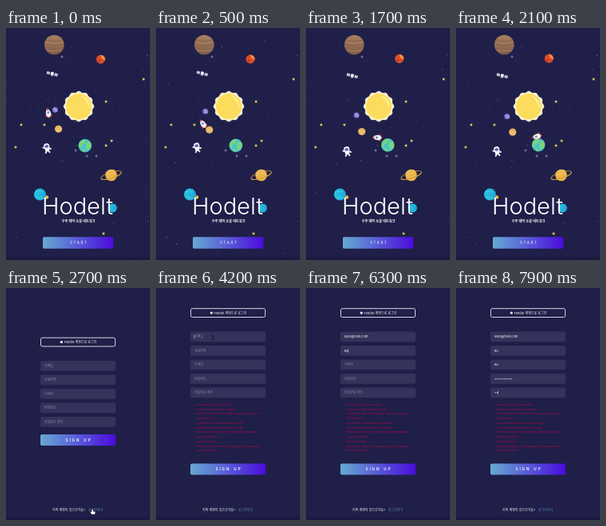
An HTML page for the animation above (8000 ms loop, 180 by 290 pixels).

```html
<!DOCTYPE html>
<html lang="ko">
<head>
<meta charset="utf-8">
<style>
  html, body { margin: 0; width: 100%; height: 100%; overflow: hidden; background: #1f1f49; }
  svg { display: block; width: 100vw; height: 100vh; }
  text { font-family: "Noto Sans CJK KR", "Noto Sans CJK", "Noto Sans", sans-serif; font-size: 4px; fill: #fff; }
  .latin { font-family: Inter, Roboto, sans-serif; }
  .hint { fill: #8f8da9; }
  .error { font-family: "Noto Sans", sans-serif; fill: #a80b48; }
</style>
</head>
<body>
<svg viewBox="0 0 180 290">
  <defs>
    <linearGradient id="action"><stop stop-color="#66a9d2"/><stop offset="1" stop-color="#4a0bdc"/></linearGradient>
    <linearGradient id="brown" x2="0" y2="1"><stop stop-color="#a8805f"/><stop offset="1" stop-color="#805c4b"/></linearGradient>
    <linearGradient id="teal"><stop stop-color="#27c8e2"/><stop offset="1" stop-color="#1fa5d8"/></linearGradient>
  </defs>
  <rect width="180" height="290" fill="#1f1f49"/>

  <g id="space">
    <g id="rings" fill="none" stroke="#2b2b56" stroke-width=".5"></g>
    <g id="dust" fill="#c9c8e4"></g>
    <g id="stars"></g>
    <g transform="translate(60.3 21)">
      <circle r="12.3" fill="url(#brown)"/>
      <path d="M-10-6Q0-3 10-6M-12-1Q0 2 12-1M-11 4Q0 7 11 4" fill="none" stroke="#8a664f" stroke-width="1.2"/>
      <path d="M-11-3Q0 0 11-3M-9 7Q0 9 9 7" fill="none" stroke="#b18e6c" stroke-width=".7"/>
    </g>
    <g id="red">
      <circle r="5.6" fill="#dc4b2a"/>
      <path d="M0-5.4A5.5 5.5 0 0 1 5.4 1Q3 0 1-1Z" fill="#f3913a"/>
      <circle cx="-2" cy="2" r="1.2" fill="#b83126"/>
    </g>
    <g id="satellite">
      <g transform="rotate(14)">
        <path d="M-7-1.7h4v3.4h-4zM3-1.7h4v3.4H3z" fill="#d3d7e6"/>
        <path d="M-5-1.7v3.4M5-1.7v3.4M-3 0H3" stroke="#6f7796" stroke-width=".5"/>
        <rect x="-1.8" y="-2.3" width="3.6" height="4.6" rx=".8" fill="#f4f4f8"/>
        <circle cy="2" r="1.1" fill="#9aa3ba"/>
      </g>
    </g>
    <g transform="translate(91 98)">
      <path id="corona" fill="#fff3c4" stroke="#fff" stroke-width=".8"/>
      <circle r="16" fill="#fbdc5c"/>
      <path d="M2-14A14 14 0 0 1 13 3Q10-9 2-14Z" fill="#feee9c"/>
    </g>
    <g id="violet">
      <circle r="3.5" fill="#7970ce"/>
      <path d="M-2-1H2M-1 1H3" stroke="#c3bcf2"/>
    </g>
    <g id="gold">
      <circle r="4.6" fill="#e5b661"/>
      <path d="M-4-1Q0 1 4-1M-3 2H3" fill="none" stroke="#f3cf83" stroke-width=".8"/>
    </g>
    <g id="earth">
      <circle r="8.3" fill="#48c4c8"/>
      <path d="M-7-4Q-3-9 1-7L0-3L-4-1L-5 3L-8 1ZM2-4L6-5Q9-1 7 3L3 6L1 2ZM-3 4L0 5L-1 8Q-4 7-5 5Z" fill="#78d47c"/>
    </g>
    <g id="rocket">
      <path d="M-4-1.6L-7 0L-4 1.6Z" fill="#f3a13c"/>
      <path d="M-3-2L-6-4.4L1-3ZM-3 2L-6 4.4L1 3Z" fill="#d93c4b"/>
      <path d="M-5-2Q1-5 6 0Q1 5-5 2Z" fill="#f1f1f6"/>
      <path d="M3.6-1.8Q5-1 6 0Q5 1 3.6 1.8Z" fill="#d93c4b"/>
      <circle cx=".5" r="1.3" fill="#4c81c5"/>
    </g>
    <g id="astronaut">
      <g transform="rotate(-10)">
        <path d="M-2 0L-4.6-1.5M2 0L4.6 1.5M-1 3L-2.4 5.4M1 3L2.4 5.4" stroke="#e3e4f3" stroke-width="2" stroke-linecap="round"/>
        <rect x="-2.6" y="-1" width="5.2" height="5" rx="1.7" fill="#f6f6fc"/>
        <circle cy="-2.6" r="3.6" fill="#f6f6fc"/>
        <ellipse cy="-2.4" rx="2.4" ry="1.9" fill="#6a62ba"/>
      </g>
    </g>
    <g transform="translate(131.5 184) rotate(-18)">
      <ellipse rx="13.3" ry="4" fill="none" stroke="#a98335" stroke-width="1"/>
      <circle r="7.3" fill="#ecb44b"/>
      <path d="M-7-2H7M-6-5H6" stroke="#f3c772" stroke-width=".8"/>
      <path d="M-13.3 0A13.3 4 0 0 0 13.3 0" fill="none" stroke="#c99a3c"/>
    </g>
    <circle cx="51" cy="211.5" r="2.2" fill="#efbf4a"/>
    <g transform="translate(42.5 208)">
      <circle r="7.5" fill="url(#teal)"/>
      <path d="M-6-3Q0-5 4-3M-4 4H3" fill="none" stroke="#4fd3e6" stroke-width=".8"/>
    </g>
    <circle cx="133.3" cy="225" r="5.5" fill="url(#teal)"/>
    <text class="latin" x="45" y="233.2" style="font-size:29px;font-weight:300">Hodelt</text>
    <text x="90.5" y="242.7" text-anchor="middle" style="font-size:4.15px;font-weight:700">우주 테마 소셜 네트워크</text>
    <rect x="46" y="261.3" width="88.3" height="14.4" rx="1.6" fill="url(#action)"/>
    <text class="latin" x="91.3" y="270.1" text-anchor="middle" letter-spacing="1.8" style="font-size:4.3px">START</text>
  </g>

  <g id="signup">
    <g id="form">
      <rect x="43.5" y="62.2" width="93" height="10.8" rx="2" fill="none" stroke="#e9e8f1" stroke-width=".9"/>
      <circle cx="69.3" cy="67.6" r="1.6" fill="#fff"/>
      <text x="72.5" y="69.2" style="font-weight:500">Fendol 계정으로 로그인</text>
      <g id="fields"></g>
    </g>
    <g id="errors"></g>
    <g id="submit">
      <rect x="43" y="183" width="94" height="14" rx="2" fill="url(#action)"/>
      <text class="latin" x="91" y="191.6" text-anchor="middle" letter-spacing="1.9" word-spacing="1" style="font-size:4.6px;font-weight:600">SIGN UP</text>
    </g>
    <text x="58" y="278.7" style="font-weight:500">이미 계정이 있으신가요?</text>
    <text x="103" y="278.7" style="fill:#5b91c9">로그인하기</text>
    <path id="caret" d="M0-2.2V2.2" stroke="#fff" stroke-width=".5"/>
  </g>

  <path id="hand" d="M-1 0Q0-1 1 0V2L3 2.6Q4 3 3.5 5L3 6H-1L-3 3Q-2 2-1 3Z" fill="#fff" stroke="#171522" stroke-width=".4"/>
  <path id="beam" d="M-1-2.5H1M0-2.5V2.5M-1 2.5H1" fill="none" stroke="#090817" stroke-width=".7"/>
  <rect y="286.5" width="180" height="3.5" fill="#1b193f"/>
</svg>
<script>
const $ = id => document.getElementById(id);
const LOOP = 8000, FORM_AT = 2300, ERRORS_AT = 3400;
const SHIFT = 36.5;

function add(parent, tag, attrs, content = '') {
  const node = document.createElementNS('http://www.w3.org/2000/svg', tag);
  for (const key in attrs) node.setAttribute(key, attrs[key]);
  node.textContent = content;
  return parent.appendChild(node);
}
const show = (node, on) => node.setAttribute('visibility', on ? 'visible' : 'hidden');
const place = (node, x, y, turn = 0) =>
  node.setAttribute('transform', `translate(${x} ${y}) rotate(${turn})`);

// Closed curve whose radius depends on its angle
function radial(radiusAt, steps) {
  return 'M' + Array.from({ length: steps }, (_, i) => {
    const a = i / steps * 2 * Math.PI;
    const r = radiusAt(a, i);
    return (r * Math.sin(a)).toFixed(2) + ' ' + (-r * Math.cos(a)).toFixed(2);
  }).join('L') + 'Z';
}
$('corona').setAttribute('d', radial(a => 18 + .8 * Math.cos(a * 12), 144));

for (const r of [30, 38, 50, 60]) add($('rings'), 'circle', { cx: 91, cy: 98, r });

let seed = 17;
const random = () => (seed = seed * 16807 % 2147483647) / 2147483647;
const dust = Array.from({ length: 85 }, () => ({
  node: add($('dust'), 'circle', {
    cx: 2 + random() * 176, cy: 5 + random() * 278, r: .25 + random() * .35
  }),
  phase: random() * 6.28
}));

const starPath = radial((a, i) => i % 2 ? 1 : 2.2, 10);
function star(x, y, fill) {
  add($('stars'), 'path', { d: starPath, fill, transform: `translate(${x} ${y})` });
}
[[12, 149], [19, 121], [48, 121], [125, 92], [125, 147], [132, 141], [172, 64], [122, 257]]
  .forEach(([x, y]) => star(x, y, '#efd455'));
[[70, 36], [87, 153], [113, 160], [101, 160]].forEach(([x, y]) => star(x, y, '#777593'));

const dots = n => '•'.repeat(n);
const fields = [
  { hint: '이메일', value: 'user@tovil.com', focus: 4100, start: 4400, step: 85 },
  { hint: '사용자명', value: 'ku', focus: 5800, start: 6000, step: 200 },
  { hint: '닉네임', value: 'ku', focus: 6400, start: 6600, step: 150 },
  { hint: '비밀번호', value: dots(10), focus: 6900, start: 7000, step: 60 },
  { hint: '비밀번호 확인', value: dots(10), focus: 7600, start: 7700, step: 150 }
].map((field, i) => {
  const y = 91 + i * 17.5;
  add($('fields'), 'rect', { x: 43, y, width: 94, height: 12.7, rx: 2, fill: '#35325b' });
  return { ...field, y: y + 6.4, node: add($('fields'), 'text', { x: 48, y: y + 7.9 }) };
});

[
  'email must be an email',
  'email should not be empty',
  'nickname must be longer than or equal to',
  '2 characters',
  'username should not be empty',
  'nickname should not be empty',
  'Password does not comply with password',
  'security policy',
  'Do not match',
  'Password does not comply with password',
  'security policy'
].forEach((line, i) => add($('errors'), 'text', { x: 50, y: 146.8 + i * 5.75, class: 'error' }, line));

function orbit(node, radius, degrees, turn = 0) {
  const a = degrees * Math.PI / 180;
  place(node, 91 + radius * Math.cos(a), 98 + radius * Math.sin(a), turn);
}

function drawSpace(s) {
  const rocketAngle = 168 - 44 * s;
  orbit($('rocket'), 39, rocketAngle, rocketAngle + 90);
  orbit($('violet'), 30, 172 - 8 * s);
  orbit($('gold'), 38, 132 - 4.7 * s);
  orbit($('earth'), 49.7, 81 - 2.4 * s);
  orbit($('red'), 65, -65 - s);
  const bob = -Math.cos((s - .4) * 2 * Math.PI / 3);
  place($('satellite'), 57.8, 58.3 + 1.5 * bob);
  place($('astronaut'), 51.2, 152 + 2.5 * bob);
  for (const { node, phase } of dust)
    node.setAttribute('opacity', .3 + .25 * Math.sin(s * 3 + phase));
}

function drawForm(t) {
  const failed = t >= ERRORS_AT;
  place($('form'), 0, failed ? -SHIFT : 0);
  place($('submit'), 0, failed ? SHIFT : 0);
  show($('errors'), failed);

  let active = null;
  for (const field of fields) {
    const typed = Math.floor((t - field.start) / field.step) + 1;
    const count = Math.max(0, Math.min(field.value.length, typed));
    field.node.textContent = count ? field.value.slice(0, count) : field.hint;
    field.node.setAttribute('class', count ? 'latin' : 'hint');
    field.width = count ? field.node.getComputedTextLength() : 0;
    if (t >= field.focus) active = field;
  }
  show($('caret'), active);
  if (active) place($('caret'), 48 + active.width, active.y - SHIFT);
}

function glide(t, start, end, from, to) {
  const p = Math.max(0, Math.min(1, (t - start) / (end - start)));
  const eased = p * p * (3 - 2 * p);
  return from.map((v, i) => v + (to[i] - v) * eased);
}

function drawPointer(t) {
  const overField = t >= 3800;
  show($('hand'), t >= FORM_AT && !overField);
  show($('beam'), overField && t < 4400);
  const link = [108, 277], button = [90, 190], email = [71, 62];
  place($('hand'), ...(t < 3500 ? glide(t, 2700, 3300, link, button) : glide(t, 3500, 4100, button, email)));
  place($('beam'), ...glide(t, 3500, 4100, button, email));
}

function draw(t) {
  const inSpace = t < FORM_AT;
  $('space').style.display = inSpace ? '' : 'none';
  $('signup').style.display = inSpace ? 'none' : '';
  if (inSpace) drawSpace(t / 1000);
  else drawForm(t);
  drawPointer(t);
}

const began = performance.now();
function tick() {
  const t = (performance.now() - began) % LOOP;
  draw(Math.floor(t / 100) * 100);
  requestAnimationFrame(tick);
}
tick();
</script>
</body>
</html>
```
